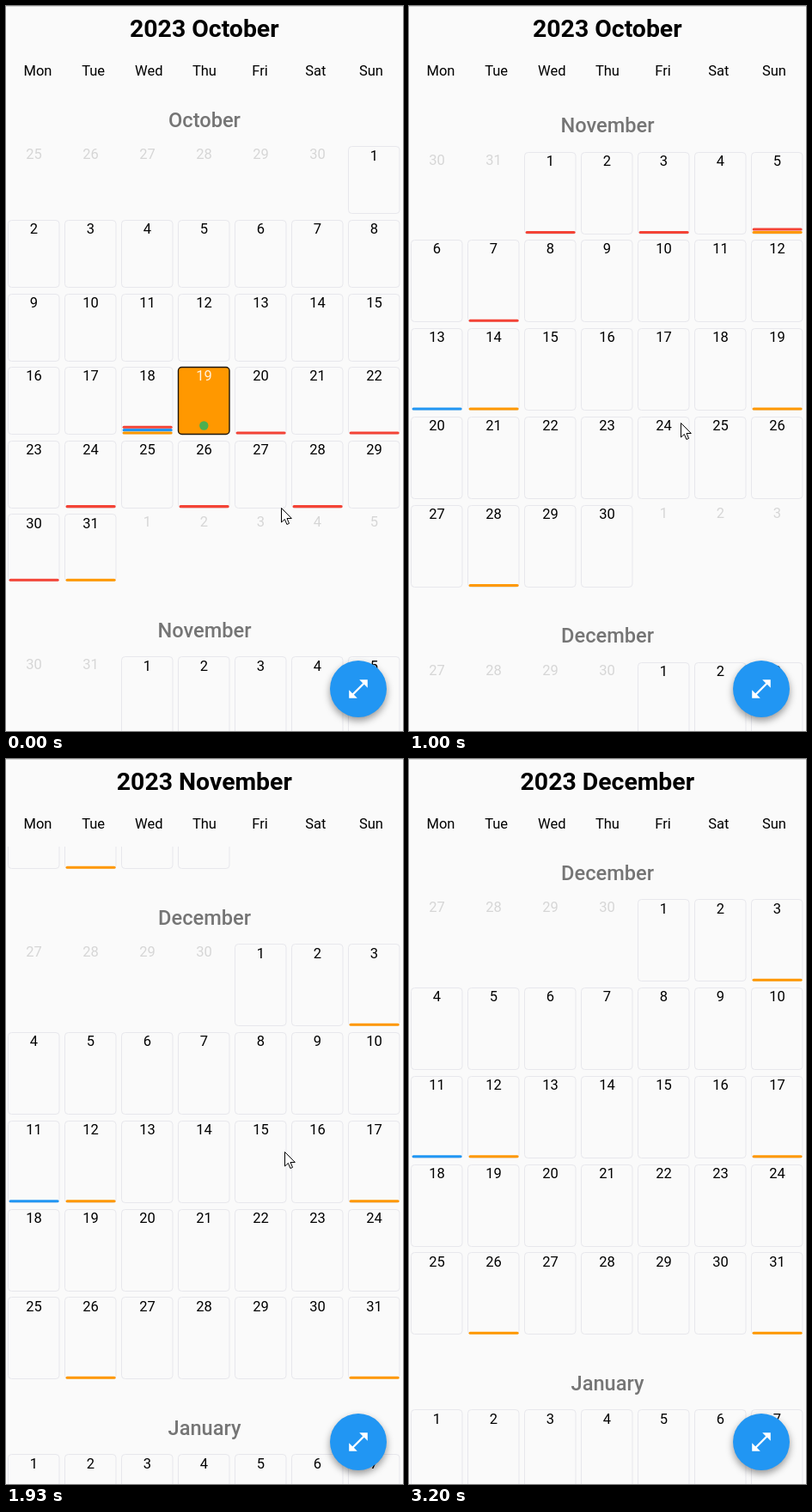
An HTML page with a canvas for the animation above (3.27 s loop, 462 px wide and 844 px high).

```html
<!DOCTYPE html>
<html lang="en">
<head>
<meta charset="utf-8">
<title>Calendar scroll</title>
<style>
html, body { margin: 0; width: 100%; height: 100%; overflow: hidden; background: #fafafa; }
canvas { display: block; }
</style>
</head>
<body>
<canvas id="stage" width="462" height="844"></canvas>
<script>
const ctx = document.getElementById('stage').getContext('2d');
const LOOP = 3270, PAGE = 594, CLIP_TOP = 102, GRID_HEIGHT = 513.8;
const BG = '#fafafa';
const COLORS = { r: '#f44336', o: '#ff9800', b: '#2196f3' };
const WEEKDAYS = ['Mon', 'Tue', 'Wed', 'Thu', 'Fri', 'Sat', 'Sun'];

// first: column of day 1; before: length of the previous month
const MONTHS = [
  { name: 'October', first: 6, days: 31, before: 30,
    events: { 18: 'rbo', 20: 'r', 22: 'r', 24: 'r', 26: 'r', 28: 'r', 30: 'r', 31: 'o' } },
  { name: 'November', first: 2, days: 30, before: 31,
    events: { 1: 'r', 3: 'r', 5: 'ro', 7: 'r', 13: 'b', 14: 'o', 19: 'o', 28: 'o' } },
  { name: 'December', first: 4, days: 31, before: 30,
    events: { 3: 'o', 11: 'b', 12: 'o', 17: 'o', 26: 'o', 31: 'o' } },
  { name: 'January', first: 0, days: 31, before: 31, events: {} }
];

// Each flick: drag from start to release, then a decaying glide to the next page
const FLICKS = [
  { start: 360, release: 470, drag: 101, settle: 1065 },
  { start: 1600, release: 1670, drag: 149.5, settle: 2265 }
];

const POINTER = [
  [0, 320, 584], [360, 320, 584], [470, 316, 485], [1130, 316, 485],
  [1530, 324, 606], [1600, 324, 606], [1670, 324, 457], [2670, 324, 457],
  [2870, 237, 551], [3140, 393, 269]
];

const ARROW = new Path2D('M0 0V16.5L3.9 13L6.4 19L9 17.9L6.5 12H11.8Z');
const EXPAND = new Path2D('M21 11V3h-8l3.29 3.29-10 10L3 13v8h8l-3.29-3.29 10-10z');

function scrollAt(t) {
  let y = 0;
  for (const f of FLICKS) {
    if (t >= f.settle) y += PAGE;
    else if (t >= f.release) y += PAGE - (PAGE - f.drag) * Math.exp(-8.25 * (t - f.release) / 1000);
    else if (t > f.start) y += f.drag * ((t - f.start) / (f.release - f.start)) ** 2;
  }
  return y;
}

function text(str, x, y, font, color) {
  ctx.font = font + ' Roboto, sans-serif';
  ctx.fillStyle = color;
  ctx.fillText(str, x, y);
}

function box(x, y, w, h, r) {
  ctx.beginPath();
  ctx.roundRect(x, y, w, h, r);
}

function drawDay(month, day, x, top, height) {
  const inside = day >= 1 && day <= month.days;
  if (!inside) {
    const label = day < 1 ? month.before + day : day - month.days;
    text(label, x + 29.5, top + 15, '16.5px', '#d6d6d6');
    return;
  }
  const selected = month === MONTHS[0] && day === 19;
  box(x - 0.5, Math.round(top) + 0.5, 59.5, Math.round(height) - 1, 4);
  if (selected) {
    ctx.fillStyle = COLORS.o;
    ctx.fill();
  }
  ctx.strokeStyle = selected ? '#1c1405' : '#e7e7ec';
  ctx.lineWidth = selected ? 1.4 : 1;
  ctx.stroke();
  text(day, x + 29.5, top + 16.2, '16.5px', selected ? '#fff2dc' : '#000');

  if (selected) {
    ctx.fillStyle = '#4caf50';
    ctx.beginPath();
    ctx.arc(x + 29.3, top + height - 10.8, 5.2, 0, 7);
    ctx.fill();
  }
  const bars = month.events[day] || '';
  [...bars].forEach((key, i) => {
    box(x + 0.6, top + height - 3.9 - (bars.length - 1 - i) * 3.4, 58, 3.1, 1.5);
    ctx.fillStyle = COLORS[key];
    ctx.fill();
  });
}

function drawMonth(month, y) {
  if (y > 844 || y + PAGE < 0) return;
  text(month.name, 231, y + 140.6, '500 23.6px', '#757575');
  const rows = Math.ceil((month.first + month.days) / 7);
  const pitch = GRID_HEIGHT / rows;
  for (let i = 0; i < rows * 7; i++) {
    const top = y + 163.3 + Math.floor(i / 7) * pitch;
    drawDay(month, i - month.first + 1, 3 + (i % 7) * 66, top, pitch - 6.5);
  }
}

function drawHeader(t) {
  ctx.fillStyle = '#d6d6d6';
  ctx.fillRect(0, 0, 462, 1);
  const page = FLICKS.filter(f => t >= f.settle).length;
  text('2023 ' + MONTHS[page].name, 230.8, 36.2, 'bold 28.4px', '#000');
  WEEKDAYS.forEach((d, i) => text(d, 37 + i * 64.65, 81, '16.5px', '#000'));
}

function drawButton() {
  ctx.save();
  ctx.shadowColor = 'rgba(0,0,0,.4)';
  ctx.shadowBlur = 9;
  ctx.shadowOffsetY = 4;
  ctx.fillStyle = COLORS.b;
  ctx.beginPath();
  ctx.arc(410, 795, 33, 0, 7);
  ctx.fill();
  ctx.restore();
  ctx.save();
  ctx.translate(410, 795);
  ctx.scale(1.2, 1.2);
  ctx.translate(-12, -12);
  ctx.fillStyle = '#fff';
  ctx.fill(EXPAND);
  ctx.restore();
}

function drawPointer(t) {
  const i = POINTER.findIndex(p => p[0] > t);
  if (i < 0) return;
  const [t0, x0, y0] = POINTER[i - 1], [t1, x1, y1] = POINTER[i];
  const k = (t - t0) / (t1 - t0);
  ctx.save();
  ctx.translate(x0 + (x1 - x0) * k + 0.5, y0 + (y1 - y0) * k + 0.5);
  ctx.fillStyle = '#fff';
  ctx.fill(ARROW);
  ctx.strokeStyle = '#000';
  ctx.lineWidth = 1;
  ctx.stroke(ARROW);
  ctx.restore();
}

function draw(t) {
  ctx.fillStyle = BG;
  ctx.fillRect(0, 0, 462, 844);
  ctx.textAlign = 'center';
  ctx.save();
  ctx.beginPath();
  ctx.rect(0, CLIP_TOP, 462, 844 - CLIP_TOP);
  ctx.clip();
  const scroll = scrollAt(t);
  MONTHS.forEach((m, i) => drawMonth(m, i * PAGE - scroll));
  ctx.restore();
  drawHeader(t);
  drawButton();
  drawPointer(t);
}

const stepTime = k => Math.round(k * 20 / 3) * 10;

function tick() {
  const t = performance.now() % LOOP;
  let k = Math.floor(t * 0.015) + 1;
  while (stepTime(k) > t) k--;
  draw(stepTime(k));
  requestAnimationFrame(tick);
}
tick();
</script>
</body>
</html>
```
